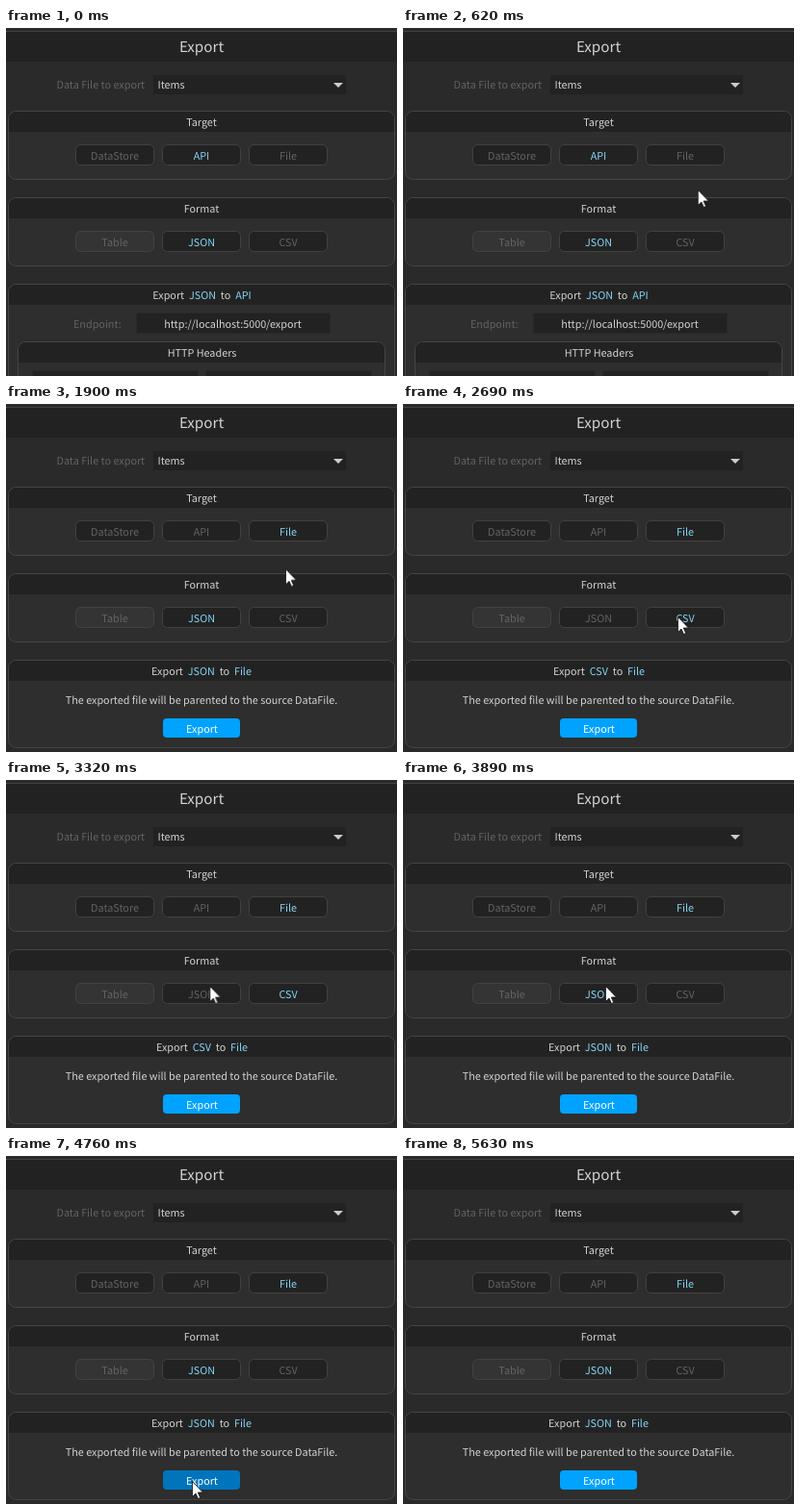
An HTML page for the animation above (6.54 s loop, 406 by 362 pixels).

```html
<!DOCTYPE html>
<html lang="en">
<head>
<meta charset="utf-8">
<title>Export panel</title>
<style>
  :root { --lit: #84d6f7; --dim: #636363; --dark: #222; --press: #666; }
  html, body { margin: 0; width: 100%; height: 100%; overflow: hidden; background: #2a2a2a; }
  svg { display: block; width: 406px; height: 362px; }
  text {
    font: 10.8px "Noto Sans CJK JP", "Noto Sans CJK SC", "Noto Sans CJK", "Noto Sans", sans-serif;
    fill: #d2d2d2; text-anchor: middle; white-space: pre; text-rendering: geometricPrecision;
  }
  .title { font-size: 15.2px; }
  .start { text-anchor: start; }
  .dim { fill: var(--dim); }
  .lit { fill: var(--lit); }
  .bar { fill: var(--dark); }
  .panel { fill: #2e2e2e; stroke: #454545; }
  .field { fill: var(--dark); stroke: #292929; }
  .btn { fill: var(--dark); stroke: #424242; }
  .off { fill: #343434; }
  .press { fill: var(--press); }

  /* every part shares one 6540 ms loop */
  .a { animation: 6540ms step-end infinite; }
  .api-view { animation-name: until-file; }
  .file-view { animation-name: from-file; }
  .api-label { animation-name: unlight; }
  .file-label { animation-name: light; }
  .json-label { animation-name: json; }
  .csv-label { animation-name: csv; }
  .json-head { animation-name: json-head; }
  .csv-head { animation-name: csv-head; }
  .press-file { animation-name: press-file; }
  .press-csv { animation-name: press-csv; }
  .press-json { animation-name: press-json; }
  .press-export { animation-name: press-export; }
  .export { fill: #00a2ff; animation-name: hover; }
  .cursor { animation-name: move, show; animation-timing-function: linear, step-end; }

  @keyframes until-file { 0% { opacity: 1 } 21.55%, 100% { opacity: 0 } }
  @keyframes from-file { 0% { opacity: 0 } 21.55%, 100% { opacity: 1 } }
  @keyframes unlight { 0% { fill: var(--lit) } 21.55%, 100% { fill: var(--dim) } }
  @keyframes light { 0% { fill: var(--dim) } 21.55%, 100% { fill: var(--lit) } }
  @keyframes json { 0%, 59.47%, 100% { fill: var(--lit) } 37.3%, 41.13% { fill: var(--dim) } 37.31% { fill: var(--lit) } }
  @keyframes csv { 0%, 59.47%, 100% { fill: var(--dim) } 41.13% { fill: var(--lit) } }
  @keyframes json-head { 0%, 59.47%, 100% { opacity: 1 } 41.13% { opacity: 0 } }
  @keyframes csv-head { 0%, 59.47%, 100% { opacity: 0 } 41.13% { opacity: 1 } }
  @keyframes press-file { 0%, 19.57%, 100% { opacity: 0 } 18.34% { opacity: 1 } }
  @keyframes press-csv { 0%, 39.14%, 100% { opacity: 0 } 37.3% { opacity: 1 } }
  @keyframes press-json { 0%, 57.03%, 100% { opacity: 0 } 55.04% { opacity: 1 } }
  @keyframes press-export { 0%, 77.98%, 100% { opacity: 0 } 75.99% { opacity: 1 } }
  @keyframes hover { 0%, 77.98%, 100% { fill: #00a2ff } 69.7% { fill: #0074bd } }
  @keyframes show { 0%, 86.08%, 100% { opacity: 0 } 5.65% { opacity: 1 } }
  @keyframes move {
    0%, 5.65% { transform: translate(268px, 346px) }
    7.64% { transform: translate(286px, 250px) }
    9.17% { transform: translate(304px, 176px) }
    11.16% { transform: translate(315px, 127px) }
    12.69%, 27.2% { transform: translate(310px, 132px) }
    29.05% { transform: translate(290px, 171px); animation-timing-function: ease-out }
    34.86%, 45% { transform: translate(285px, 221px); animation-timing-function: linear }
    45.01% { transform: translate(285px, 221px); animation-timing-function: ease-in-out }
    51.37%, 62.8% { transform: translate(210px, 214px) }
    62.81% { transform: translate(210px, 214px); animation-timing-function: ease-in-out }
    72.78%, 85.46% { transform: translate(193px, 338px) }
    85.47%, 100% { transform: translate(193px, 350px) }
  }
</style>
</head>
<body>
<svg viewBox="0 0 406 362">
  <defs>
    <path id="head" class="bar" d="M3 108V94.500a7.500 7.500 0 0 1 7.500-7.500h385a7.500 7.500 0 0 1 7.500 7.500V108z"/>
    <rect id="btn" x=".5" y=".5" width="81" height="21" rx="5"/>
    <rect id="press" class="press" x=".5" y=".5" width="81" height="21" rx="5"/>
    <circle id="click" r="12" fill="#c8c218" opacity=".86"/>
  </defs>

  <rect width="406" height="362" fill="#2a2a2a"/>
  <rect y="3" width="406" height="1" fill="#424242"/>
  <rect class="bar" y="4" width="406" height="31"/>
  <text class="title" x="203" y="25">Export</text>

  <text class="dim start" x="52.500" y="63">Data File to export</text>
  <rect class="field" x="152.500" y="48.500" width="201" height="21"/>
  <text class="start" x="157.500" y="63">Items</text>
  <path d="M340 57h10l-5 5z" fill="#ccc"/>

  <rect class="panel" x="2.500" y="86.500" width="401" height="71" rx="8"/>
  <use href="#head"/>
  <text x="203" y="102">Target</text>
  <use href="#btn" class="btn" x="72" y="121"/>
  <use href="#btn" class="btn" x="162" y="121"/>
  <use href="#btn" class="btn" x="252" y="121"/>
  <use href="#press" class="a press-file" x="252" y="121"/>
  <text class="dim" x="113" y="137">DataStore</text>
  <text class="a api-label" x="203" y="137">API</text>
  <text class="a file-label" x="293" y="137">File</text>

  <rect class="panel" x="2.500" y="176.500" width="401" height="71" rx="8"/>
  <use href="#head" y="90"/>
  <text x="203" y="192">Format</text>
  <use href="#btn" class="btn off" x="72" y="211"/>
  <use href="#btn" class="btn" x="162" y="211"/>
  <use href="#btn" class="btn" x="252" y="211"/>
  <use href="#press" class="a press-csv" x="252" y="211"/>
  <use href="#press" class="a press-json" x="162" y="211"/>
  <text class="dim" x="113" y="227">Table</text>
  <text class="a json-label" x="203" y="227">JSON</text>
  <text class="a csv-label" x="293" y="227">CSV</text>

  <g class="a api-view">
    <rect class="panel" x="2.500" y="266.500" width="401" height="120" rx="8"/>
    <use href="#head" y="180"/>
    <text x="203.500" y="282">Export  <tspan class="lit">JSON</tspan>  to  <tspan class="lit">API</tspan></text>
    <text class="dim start" x="70" y="312">Endpoint:</text>
    <rect class="field" x="135.500" y="296.500" width="201" height="21"/>
    <text x="235.500" y="312">http://localhost:5000/export</text>
    <rect class="panel" x="12.500" y="326.500" width="381" height="60" rx="8"/>
    <path class="bar" d="M13 348V334.500a7.500 7.500 0 0 1 7.500-7.500h365a7.500 7.500 0 0 1 7.500 7.500V348z"/>
    <text x="203.500" y="342">HTTP Headers</text>
    <rect class="field" x="27.500" y="356.500" width="172" height="21"/>
    <rect class="field" x="207.500" y="356.500" width="172" height="21"/>
  </g>

  <g class="a file-view">
    <rect class="panel" x="2.500" y="266.500" width="401" height="91" rx="8"/>
    <use href="#head" y="180"/>
    <text class="a json-head" x="203" y="282">Export  <tspan class="lit">JSON</tspan>  to  <tspan class="lit">File</tspan></text>
    <text class="a csv-head" x="203.500" y="282">Export  <tspan class="lit">CSV</tspan>  to  <tspan class="lit">File</tspan></text>
    <text x="203" y="312">The exported file will be parented to the source DataFile.</text>
    <rect class="a export" x="163" y="327" width="80" height="20" rx="4"/>
    <text x="203.500" y="342" style="fill: #fff">Export</text>
  </g>

  <g class="a press-file"><use href="#click" x="310" y="132"/></g>
  <g class="a press-csv"><use href="#click" x="285" y="221"/></g>
  <g class="a press-json"><use href="#click" x="210" y="214"/></g>
  <g class="a press-export"><use href="#click" x="194" y="337"/></g>
  <path class="a cursor" d="M.5.5V16.500L4 13l2.500 5.500 2.200-1L6.300 12h5.200z" fill="#fff" stroke="#111" stroke-width=".8"/>
</svg>
</body>
</html>
```
